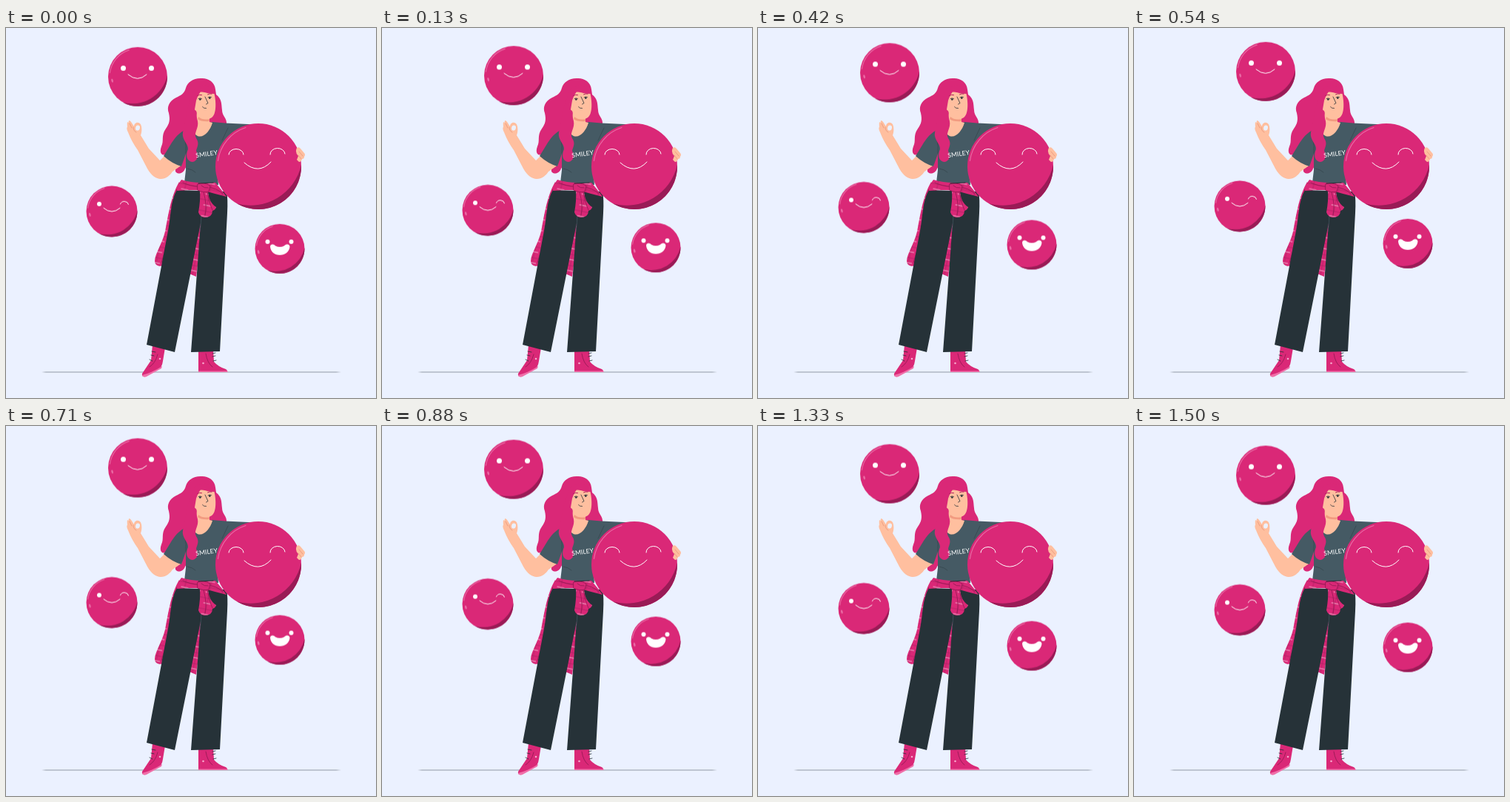
Write an HTML page that moves like this. It is 500 px wide and 500 px high and loops after 1.54 s.

```html
<!DOCTYPE html>
<html lang="en">
<head>
<meta charset="utf-8">
<title>Smiley</title>
<style>
  html, body { margin: 0; width: 100%; height: 100%; overflow: hidden; background: #ebf1ff; }
  svg { display: block; width: 100vw; height: 100vh; }
  .pink { fill: #da2877; }
  .wine { fill: #991b56; }
  .skin { fill: #ffbf9f; }
  .shirt { fill: #455a64; }
  .pants { fill: #263238; }
  .plaid { fill: url(#plaid); }
  .line { fill: none; stroke-linecap: round; stroke-linejoin: round; }
  .ink { stroke: #263238; stroke-width: .8; }
  .white { fill: #fff; }
  .smile { stroke: #fff; stroke-width: 1; }
  .glow { stroke: #ea6ba5; stroke-width: 1.1; }
  .fold { stroke: #991b56; stroke-width: .9; }
  .soft { stroke: #e8967a; stroke-width: .8; }
  text { font: 8.6px Lato, "Open Sans", sans-serif; fill: #fff; }
</style>
</head>
<body>
<svg viewBox="0 0 500 500" xmlns="http://www.w3.org/2000/svg">
  <defs>
    <pattern id="plaid" width="17" height="15" patternUnits="userSpaceOnUse" patternTransform="translate(4 3) rotate(12)">
      <rect class="pink" width="17" height="15"/>
      <path d="M0 4H17M5 0V15" stroke="#b01f63" stroke-width=".8"/>
      <path d="M0 11H10" stroke="#f4b5d2" stroke-width=".9"/>
    </pattern>
  </defs>

  <path d="M48 465L54 464.500H446L453 465L446 465.500H54Z" fill="#9199a3"/>

  <!-- hair behind -->
  <path class="pink" d="M283 83C282 72 272 67 263 68C252 68 245 74 243 81C241 89 236 91 230 94C220 99 217 107 220 115C222 124 221 129 216 136C209 146 214 152 210 160C207 168 210 173 215 171L229 165L238 175C234 184 228 188 229 194C233 199 240 196 242 190L262 160L298 130C299 122 292 119 292 111C291 103 292 96 284 90Z"/>

  <!-- raised arm -->
  <path class="skin" d="M215 172L208 179L193 163L182 145C184 140 184 132 181 129C177 126 173 129 173 133C171 130 169 126 167 125C165 125 166 128 166 129L165 127C163 127 164 131 164 134C163 134 163 137 165 141C168 149 173 158 178 165L191 190C196 199 203 204 209 204C216 204 222 199 225 194L238 185Z"/>
  <ellipse cx="178" cy="135" rx="2.9" ry="3.6" transform="rotate(12 178 135)" fill="#ebf1ff"/>
  <path class="line soft" d="M172 134Q172 139 176 141M167 129L170 135"/>

  <!-- shirt -->
  <path class="shirt" d="M248 136L279 127L296 128.500L338 130.500L301 148L290 160L285 184L287 212L241 209L243 192L243 170L237 187Q224 183 213 173L224 155C230 146 237 138 248 136Z"/>
  <path class="line" d="M243 169Q244 159 242 152M245 190Q252 191 256 195M300 135L292 152" stroke="#37474f" stroke-width=".8"/>

  <!-- neck and head -->
  <path class="skin" d="M258 110L275 118V127L279 128C276 139 267 149 259 146C254 144 254 139 257 134Z"/>
  <path d="M260 120Q266 125 275 123V126Q264 127 259 123Z" fill="#f29b80"/>
  <path class="skin" d="M257 86Q268 87 281 87C284 98 285 116 278 121C271 126 259 120 257 112C251 109 252 98 257 98Z"/>
  <path class="pink" d="M251 92C253 80 263 76 272 78Q282 79 283 89Q271 89 264 85Q260 89 257 98L255 110Q257 118 259 126C261 135 253 142 257 149C262 156 258 161 257 166C261 174 258 180 252 181C243 180 243 170 246 164C247 157 237 151 239 141L246 106Z"/>
  <text transform="translate(256.800 175.200) rotate(-8)">SMILEY</text>
  <path class="line" d="M258.500 91.500Q261 89.500 264.500 90.500M272.500 89.800Q275 88.300 278 89" stroke="#b3205f" stroke-width="1"/>
  <path class="line ink" d="M260 95.500Q262 94 264.500 95.500M273 93.800Q275 92.300 277.500 93.300"/>
  <circle cx="262.300" cy="96.500" r="1.300" class="pants"/>
  <circle cx="275.300" cy="94.600" r="1.300" class="pants"/>
  <path class="line ink" d="M269 93L273 101.500L270.500 103M265.500 106.500Q267 109 270.500 108.500"/>

  <!-- boots -->
  <path class="pink" d="M198 428L215 432L212 450Q211 459 205 462L190 470Q183 473 184 467L196 449Z"/>
  <path d="M184 469Q197 466 211 457L210 460L190 471Q185 473 184 469Z" fill="#f06fa9"/>
  <path class="pink" d="M260 434H280L281 451Q287 458 297 461Q299 462 299 464H260Z"/>
  <path d="M260 463.500H299.500V465H260Z" fill="#f06fa9"/>
  <path class="line ink" d="M197 437L202 438M196 442L200 443M194 448L198 450M279 440L283 439M279 444L283 443M280 450L284 449"/>
  <path class="line fold" d="M205 441Q202 453 194 458M270 440Q272 453 279 458"/>
  <circle cx="208" cy="447" r="1.300" fill="#f7a8cb"/>
  <circle cx="266.500" cy="453" r="1.300" fill="#f7a8cb"/>

  <!-- tied shirt hanging behind, then trousers -->
  <path class="plaid" d="M234 208C222 228 218 261 215 275C211 292 201 305 201 315C201 321 207 323 213 321L250 333L257 336L267 260Z"/>
  <path class="line fold" d="M231 218C224 244 222 281 210 317"/>
  <path class="pants" d="M231 219L298 221Q300 230 299 250L289 437L250 438L263 264L228 438L190 428L219 274C223 254 222 234 231 219Z"/>
  <path class="line" d="M264 251Q264 262 262 275" stroke="#455a64" stroke-width=".7"/>

  <!-- waist wrap and knot -->
  <path class="plaid" d="M237 205Q250 209 264 209L283 209Q291 218 298 228Q282 224 268 220Q251 218 231 220Q232 211 237 205Z"/>
  <path class="line fold" d="M239 209Q249 214 261 214M272 215Q285 216 293 224"/>
  <path class="plaid" d="M262 219L273 218C273 229 277 238 284 242Q283 246 279 247Q279 256 268 256Q262 255 260 249Q263 233 262 219Z"/>
  <path class="line fold" d="M267 222Q272 239 269 253M272 222Q275 237 279 246"/>
  <path class="pink" d="M259 211Q267 208 276 213L274 221Q266 223 259 219Z"/>
  <path class="line fold" d="M259 211Q267 208 276 213L274 221Q266 223 259 219ZM264 213Q268 217 273 216"/>
  <path class="line" d="M260 210L280 209" stroke="#263238" stroke-width="1"/>

  <g id="balls"></g>

  <!-- holding fingers -->
  <path class="skin" d="M393 162Q396 160 398 163L403 169Q405 171 403 174Q403 177 400 177Q399 181 396 181L393 178L395 173Q390 168 393 162Z"/>
  <path class="line soft" d="M396 167L401 173M395 172L399 177"/>
</svg>

<script>
  const LOOP = 1540;
  const bob = [[0, 0], [720, -9.58], [1490, .66], [LOOP, 0]];
  const line = d => `<path class="line smile" d="${d}"/>`;
  const dot = (x, y, r) => `<circle class="white" cx="${x}" cy="${y}" r="${r}"/>`;

  const balls = [
    { x: 341, y: 187, r: 58, still: true,
      face: line('M-40 -16A10 7.500 0 0 1 -20 -16M16 -16A10 8 0 0 1 36 -17M-19 -5Q0 12 17 -6') },
    { x: 178, y: 66, r: 40,
      face: dot(-19.5, -11.5, 3.5) + dot(18.5, -11.5, 3.5) + line('M-13 -3Q0 8 12 -3') },
    { x: 143, y: 248, r: 34.5,
      face: dot(-17, -10, 3) + line('M11.500 -10A5.700 5 0 0 1 22.500 -9.500M-11 -4.500Q0 5 11 -4.500') },
    { x: 370, y: 298.5, r: 33.5,
      face: dot(-16.5, -9.5, 3) + dot(15.5, -9.5, 3) +
        '<path class="white" d="M-13 -3C-12.500 -7 -8 -6.500 -6 -4Q0 -1 6 -4C9 -7 13 -6.500 13.500 -3C13 4 7 8.500 0 8.500C-7 8.500 -12.500 4 -13 -3Z"/>' }
  ];

  // Disc, crescent shade, rim light and face
  function drawBall({ x, y, r, face, still }) {
    const at = (deg, k = 1) => {
      const a = deg * Math.PI / 180;
      return `${r * k * Math.cos(a)} ${r * k * Math.sin(a)}`;
    };
    const arc = (a, b, k) => `M${at(a, k)}A${r * k} ${r * k} 0 0 1 ${at(b, k)}`;
    const g = document.createElementNS('http://www.w3.org/2000/svg', 'g');
    g.innerHTML = `<g transform="translate(${x} ${y})">
      <circle class="pink" r="${r}"/>
      <path class="wine" d="${arc(-2, 120, 1)}A${r * 1.21} ${r * 1.21} 0 0 0 ${at(-2)}Z"/>
      <path class="line glow" d="${arc(188, 252, .95)}"/>
      ${still ? '' : `<ellipse cx="${-r * .86}" cy="${r * .13}" rx="1.3" ry="2.6"
        transform="rotate(-14 ${-r * .86} ${r * .13})" fill="#ea6ba5"/>`}
      ${face}</g>`;
    document.getElementById('balls').append(g);
    if (still) return;
    const steps = bob.map(([t, dy]) => ({ offset: t / LOOP, transform: `translate(0px, ${dy}px)` }));
    g.animate(steps, { duration: LOOP, iterations: Infinity, easing: 'linear' });
  }

  balls.forEach(drawBall);
</script>
</body>
</html>
```
